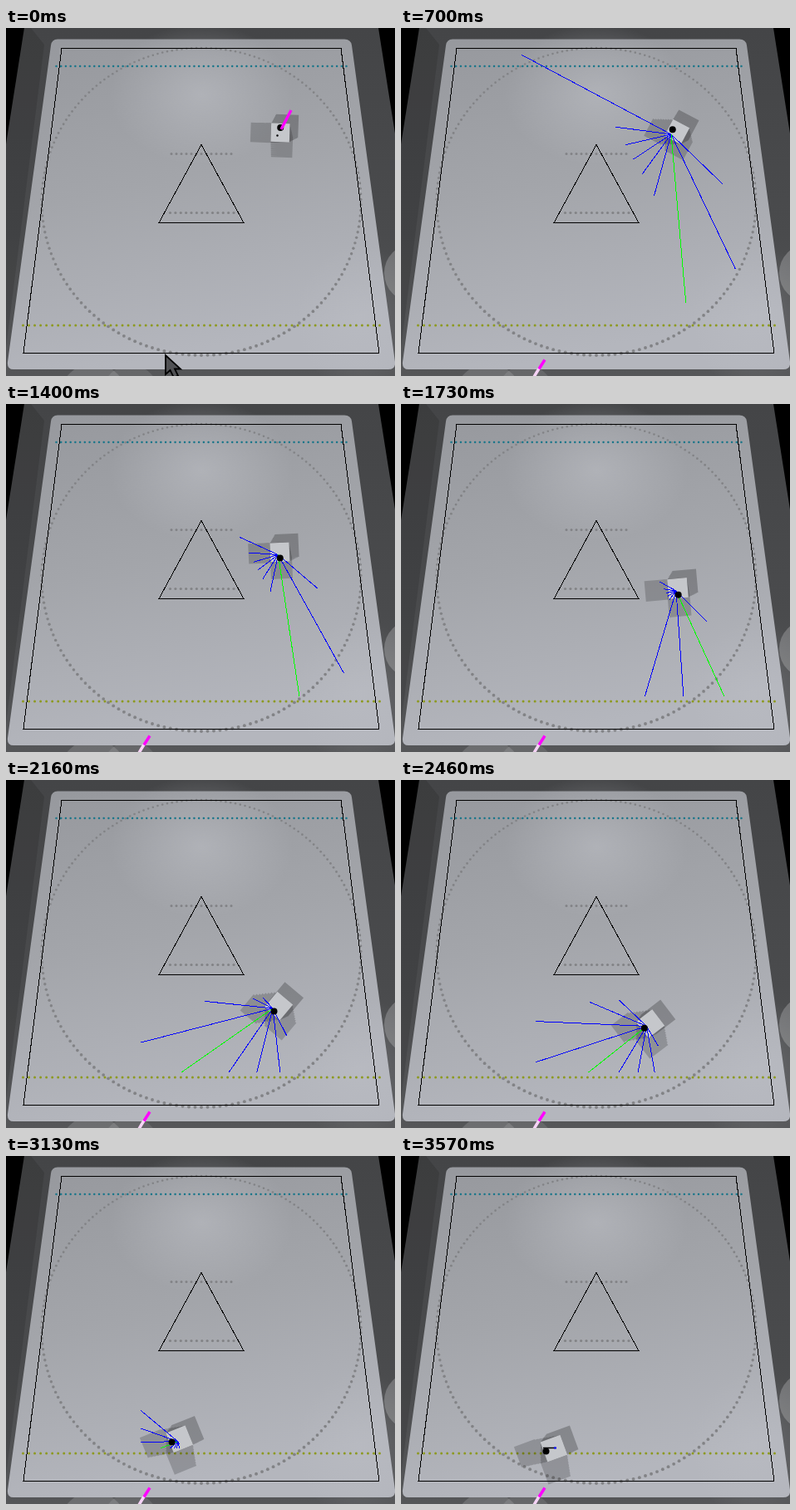
These frames come from a looping animation (468x419 px, 3620 ms). An HTML page:

```html
<!DOCTYPE html>
<html lang="en">
<head>
<meta charset="utf-8">
<title>Robot arena</title>
<style>
html, body { margin: 0; width: 100%; height: 100%; overflow: hidden; background: #000; }
svg { display: block; width: 468px; height: 419px; }
.thin { fill: none; stroke: #000; stroke-width: 1; shape-rendering: crispEdges; }
</style>
</head>
<body>
<svg viewBox="0 0 468 419" width="468" height="419">
  <defs>
    <linearGradient id="floor" x1="0" y1="0" x2=".25" y2="1">
      <stop offset="0" stop-color="#96989d"/>
      <stop offset=".5" stop-color="#a3a5aa"/>
      <stop offset="1" stop-color="#b4b6bd"/>
    </linearGradient>
    <radialGradient id="glow">
      <stop offset="0" stop-color="#c2c4ca" stop-opacity=".5"/>
      <stop offset="1" stop-color="#c2c4ca" stop-opacity="0"/>
    </radialGradient>
    <linearGradient id="slab" x1="0" y1="0" x2="0" y2="1">
      <stop offset="0" stop-color="#444547"/>
      <stop offset=".6" stop-color="#4a4b4d"/>
      <stop offset="1" stop-color="#555658"/>
    </linearGradient>
  </defs>
  <rect width="468" height="419"/>
  <path d="M22 0H448L468 127V419H0V140Z" fill="url(#slab)"/>
  <path d="M22 0L0 140V385L46 20L30 0Z" opacity=".12"/>
  <g fill="#fff">
    <circle cx="490" cy="295" r="35" opacity=".22"/>
    <circle cx="105" cy="444" r="40" opacity=".14"/>
    <circle cx="150" cy="440" r="34" opacity=".1"/>
  </g>
  <path d="M62 13.500H407Q415 13.500 416 21L468 402Q469 411 460 411H9Q1 411 2 402L54 21Q55 13.500 62 13.500Z" fill="url(#floor)"/>
  <ellipse cx="235" cy="80" rx="110" ry="85" fill="url(#glow)"/>
  <ellipse cx="425" cy="350" rx="75" ry="90" fill="url(#glow)" opacity=".5"/>
  <g id="dots"></g>
  <path class="thin" d="M67 24.500H403L449 391.500H21Z"/>
  <path class="thin" d="M235 140.500L184 234.500H286Z"/>
  <g id="shades"></g>
  <path id="cube" fill="#c5c7cb"/>
  <g id="beams" class="thin"></g>
  <circle id="ball" r="4"/>
  <g id="rest">
    <path d="M171 351.500H186" stroke="#000" stroke-width="1.500"/>
    <path d="M184 351.500H187" stroke="#00f" stroke-width="2"/>
  </g>
  <g id="idle">
    <path d="M331 122L343 99" stroke="#f0f" stroke-width="3.500"/>
    <circle cx="326.500" cy="129.500" r="1.200"/>
    <path d="M192 394V417L197.500 412L202 421L207 418.500L203 410.500H210Z" fill="#505154" stroke="#000" stroke-width="1.800"/>
  </g>
  <g id="marker" stroke-width="3.500">
    <path d="M166 410L160 420" stroke="#f6d3f6"/>
    <path d="M173 399.500L166 410.500" stroke="#f0f"/>
  </g>
</svg>
<script>
const LOOP = 3620, TICKS = 75, RAD = Math.PI / 180;
const GREY = '#828386';
const $ = id => document.getElementById(id);

function add(id, tag, attrs) {
  const el = document.createElementNS('http://www.w3.org/2000/svg', tag);
  for (const k in attrs) el.setAttribute(k, attrs[k]);
  return $(id).appendChild(el);
}

const dot = (x, y, r, fill) => add('dots', 'circle', { cx: x, cy: y, r, fill });

function dotRow(x1, x2, y, n, r, fill) {
  for (let i = 0; i < n; i++) dot(x1 + (x2 - x1) * i / (n - 1), y, r, fill);
}

// Ring seen in perspective: dots grow and spread towards the viewer
for (let i = 0; i < 180; i++) {
  const q = i * 2 * RAD, a = q - 0.12 * Math.cos(q);
  dot(235 + 192 * Math.cos(a), 209 + 185 * Math.sin(a), 1.6 + 0.35 * Math.sin(a), GREY);
}
dotRow(60.5, 409.5, 46, 62, 1.25, '#1a768a');
dotRow(199, 271, 151.5, 13, 1.5, GREY);
dotRow(197.500, 274, 222.5, 13, 1.6, GREY);
dotRow(20.5, 449.5, 358, 62, 1.5, '#8d9a20');

// tick, cube x, y, heading, sensor shift, angle of the first beam
const PATH = [
  [0, 330, 126, -88, -6, 44],
  [14, 332, 125, -152, -7, 44],
  [23, 326, 140, -270, -2, 36],
  [35, 333, 222, -275, -2, 45],
  [44, 328, 272, -230, -7, 63],
  [56, 264, 312, -205, -2, 56],
  [67, 192, 349, -201, -2, 56],
  [74, 184, 352, -200, -2, 56]
];

// Smooth for the place, straight for the rest
function poseAt(tick) {
  let i = 0;
  while (i < PATH.length - 2 && tick >= PATH[i + 1][0]) i++;
  const a = PATH[i], b = PATH[i + 1], d = b[0] - a[0];
  const u = (tick - a[0]) / d, v = 1 - u;
  const slope = (n, c) => n && PATH[n + 1]
    ? (PATH[n + 1][c] - PATH[n - 1][c]) / (PATH[n + 1][0] - PATH[n - 1][0]) : 0;
  const line = c => a[c] + (b[c] - a[c]) * u;
  const curve = c => a[c] + (b[c] - a[c]) * u * u * (3 - 2 * u)
    + d * u * v * (v * slope(i, c) - u * slope(i + 1, c));
  return { x: curve(1), y: curve(2), turn: line(3), shift: line(4), fan: line(5) };
}

// What the sensor sees: floor line, right side, left side, two sides of the triangle
const WALLS = [
  [100, 352, 420, 352],
  [378.5, 100, 410, 352],
  [162, 240, 162, 352],
  [245, 96, 324, 237],
  [150, 272, 310, 262]
];

function cast(x, y, deg, range) {
  const cos = Math.cos(deg * RAD), sin = Math.sin(deg * RAD);
  let dist = range, wall = -1;
  WALLS.forEach(([x1, y1, x2, y2], i) => {
    const wx = x2 - x1, wy = y2 - y1, det = cos * wy - sin * wx;
    const d = ((x1 - x) * wy - (y1 - y) * wx) / det;
    const s = ((x1 - x) * sin - (y1 - y) * cos) / det;
    if (d > 0 && d < dist && s >= 0 && s <= 1) [dist, wall] = [d, i];
  });
  return { x: x + dist * cos, y: y + dist * sin, dist, open: sin > 0 && wall < 1 };
}

function square(x, y, size, deg) {
  const r = size / Math.SQRT2;
  const pts = [45, 135, 225, 315].map(c => {
    const a = (c + deg) * RAD;
    return (x + r * Math.cos(a)).toFixed(2) + ' ' + (y + r * Math.sin(a)).toFixed(2);
  });
  return 'M' + pts.join('L') + 'Z';
}

// A cube's shadow: its square swept away from the base
function sweep(x, y, dx, dy, size, grow, deg) {
  let d = '';
  for (let s = 0; s <= 1; s += 0.125) d += square(x + dx * s, y + dy * s, size + grow * s, deg);
  return d;
}

const shades = [0.19, 0.19, 0.24].map(opacity => add('shades', 'path', { opacity }));
const beams = Array.from({ length: 9 }, () => add('beams', 'path', {}));
const show = (id, on) => $(id).setAttribute('visibility', on ? 'visible' : 'hidden');

function draw(tick) {
  const { x, y, turn, shift, fan } = poseAt(tick);
  const u = (y - 126) / 226, size = 22.5 + 3 * u;

  [[-24 - 7 * u, 6 * u, 1], [2, 17 + 8 * u, 3], [8 + 2 * u, -8, 5]].forEach(([dx, dy, grow], i) =>
    shades[i].setAttribute('d', sweep(x, y, dx, dy, size, grow, turn)));
  $('cube').setAttribute('d', square(x, y, size, turn));
  const reach = 6 + 4 * u;
  $('ball').setAttribute('cx', x + reach * Math.cos(turn * RAD));
  $('ball').setAttribute('cy', y + reach * Math.sin(turn * RAD));

  // The longest clear beam is the way to go
  const sx = x + shift, sy = y + 3;
  const hits = beams.map((_, i) => cast(sx, sy, fan + 20.5 * i, i ? 204 : 110 - 1.65 * tick));
  const best = Math.max(...hits.slice(1).filter(h => h.open).map(h => h.dist));
  hits.forEach((h, i) => {
    beams[i].setAttribute('d', `M${sx} ${sy}L${h.x} ${h.y}`);
    beams[i].setAttribute('stroke', h.open && h.dist === best ? '#0f0' : '#00f');
  });

  show('beams', tick > 1 && tick < 69);
  show('rest', tick >= 69);
  show('idle', tick < 1);
  show('marker', tick >= 1);
}

const begin = performance.now();
function frame() {
  const t = (performance.now() - begin) % LOOP;
  draw(Math.floor(t * TICKS / LOOP));
  requestAnimationFrame(frame);
}
frame();
</script>
</body>
</html>
```
